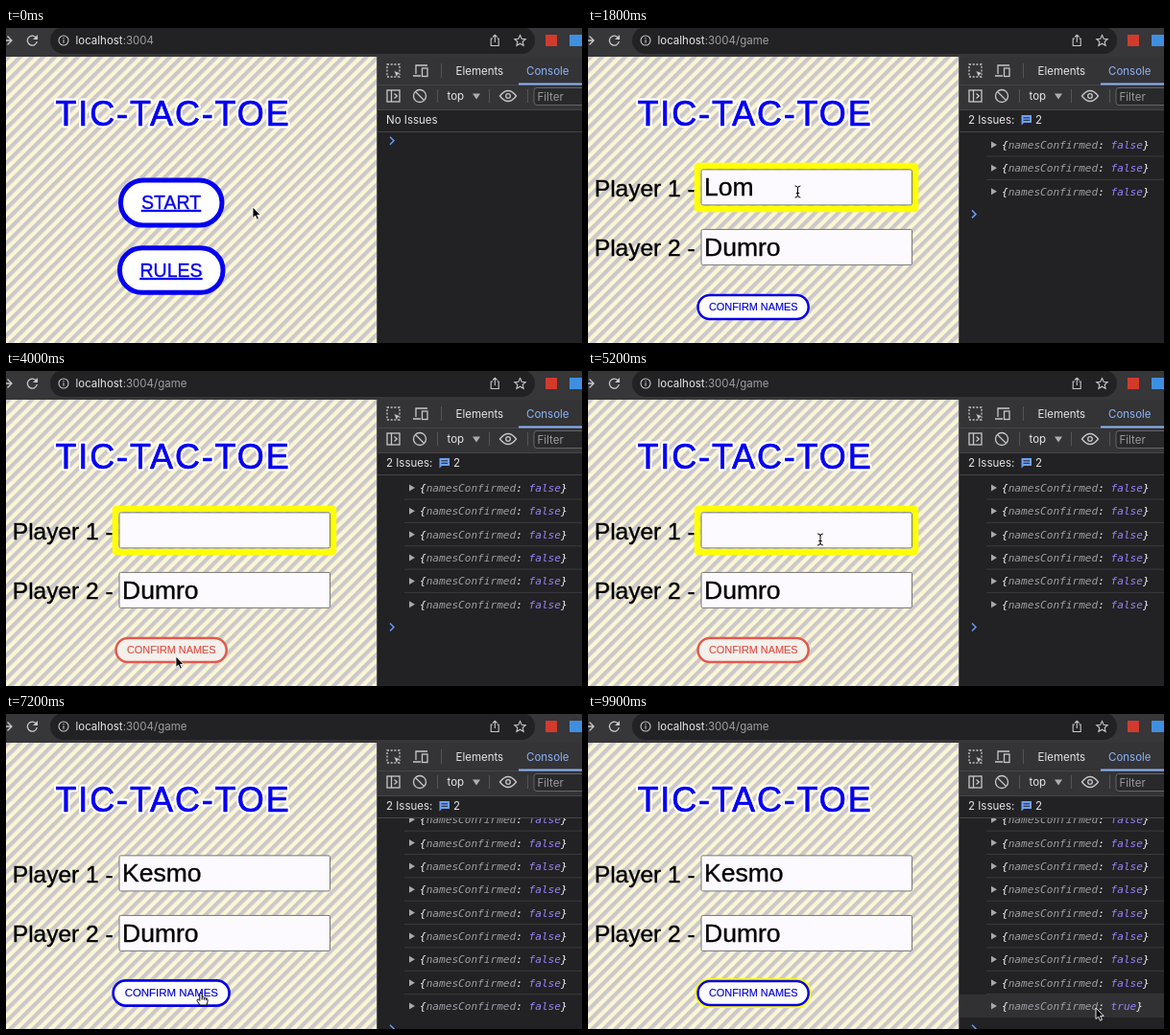
An HTML page that plays this animation: 600 by 329 pixels, repeating every 10 s.

```html
<!DOCTYPE html>
<html lang="en">
<head>
<meta charset="utf-8">
<title>Tic-tac-toe</title>
<style>
html, body { margin: 0; width: 100%; height: 100%; overflow: hidden; background: #222123; }
svg { display: block; width: 100vw; height: 100vh; }
text { white-space: pre; font-family: "Liberation Sans", Arial, sans-serif; }
.ui text { font: 11.5px Inter, Roboto, sans-serif; fill: #e6e6e8; }
.ui text.dim { fill: #9b9a9f; }
.ui text.on { fill: #8ab4f8; }
.ui .log text { font: italic 11.1px "DejaVu Sans Mono", monospace; fill: #f4f4f6; stroke-width: .2px; }
.key { fill: #a09fa5; }
.bool { fill: #9a84fb; }
.icon { fill: none; stroke: #c8c7cb; stroke-width: 1.3; }
.sep { stroke: #555457; }
.title { font-size: 36px; letter-spacing: 1.85px; }
.halo { stroke: #fff; stroke-width: 5px; stroke-linejoin: round; }
.face { fill: #0500f0; stroke: #0500f0; stroke-width: .7px; }
.link text { font-size: 19.5px; fill: #0500f0; stroke: #0500f0; stroke-width: .35px; text-decoration: underline; text-anchor: middle; }
.link rect { fill: #fff; stroke: #0500f0; stroke-width: 5px; }
.label, .value { stroke: #000; stroke-width: .35px; }
.label { font-size: 24.5px; }
.value { font-size: 26.5px; }
.field { fill: #fdfaff; stroke: #767676; }
.ring { fill: none; stroke: #ffff00; }
.confirm text { font-size: 10.9px; text-anchor: middle; fill: #0500d8; stroke: #0500d8; stroke-width: .15px; }
.confirm .pill { fill: #fff; stroke: #0500e6; stroke-width: 2.5px; }
.confirm.off text { fill: #dd5045; stroke: #dd5045; }
.confirm.off .pill { fill: #f4f0ec; stroke: #e05a4e; }
</style>
</head>
<body>
<svg viewBox="0 0 600 329" preserveAspectRatio="none">
  <defs>
    <pattern id="stripes" width="8.5" height="8.5" patternUnits="userSpaceOnUse" patternTransform="translate(0 30) rotate(45)">
      <rect width="8.5" height="8.5" fill="#fcf6d4"/>
      <rect width="4.25" height="8.5" fill="#cbc8cc"/>
    </pattern>
    <text class="title" id="title" x="51.500" y="101.500">TIC-TAC-TOE</text>
    <path id="beamShape" d="M-2.500-6Q0-6 0-4V4Q0 6-2.500 6M2.500-6Q0-6 0-4M0 4Q0 6 2.500 6M-1.300 1.500H1.300"/>
    <clipPath id="consoleArea"><rect x="387" y="109" width="213" height="220"/></clipPath>
  </defs>

  <rect y="30" width="387" height="299" fill="url(#stripes)"/>
  <use class="halo" href="#title"/>
  <use class="face" href="#title"/>

  <g id="home">
    <g class="link" id="start">
      <rect x="119.500" y="159" width="105.500" height="47" rx="23.500"/>
      <text x="172" y="189">START</text>
    </g>
    <g class="link">
      <rect x="118.500" y="229.800" width="107.500" height="46.500" rx="23"/>
      <text x="172" y="260">RULES</text>
    </g>
  </g>

  <g id="game">
    <text class="label" x="6.800" y="175.500">Player 1 -</text>
    <text class="label" x="6.800" y="238">Player 2 -</text>
    <rect class="ring" id="fieldRing" x="114" y="144" width="227" height="45" rx="1" stroke-width="6.5"/>
    <rect class="field" x="118" y="147.900" width="219.500" height="37" rx="1.500"/>
    <rect class="field" x="118" y="210.400" width="219.500" height="37" rx="1.500"/>
    <text class="value" id="first" x="121" y="175"></text>
    <text class="value" x="121" y="237.500">Dumro</text>
    <g class="confirm" id="confirm">
      <rect class="ring" id="confirmRing" x="112.500" y="277.200" width="119" height="28.600" rx="14.300" stroke-width="2.4"/>
      <rect class="pill" x="114.500" y="279" width="115.200" height="25" rx="12.500"/>
      <text x="172.300" y="295.300">CONFIRM NAMES</text>
    </g>
  </g>

  <g class="ui">
    <rect width="600" height="30" fill="#373639"/>
    <rect x="46" y="-1" width="505" height="28" rx="14" fill="#222123"/>
    <path class="icon" d="M-4 13H6M1.500 8.500L6 13L1.500 17.500M31.500 10.300A5 5 0 1 0 32.300 14"/>
    <path d="M33 7v5h-5z" fill="#c8c7cb"/>
    <g class="icon" style="stroke-width:1.1px">
      <circle cx="60" cy="13" r="5"/>
      <path d="M60 12.300v3.500M60 10v1.200"/>
      <path d="M507 11h-1.800v7.500h8V11H511.500M509.300 15V7.500M507 9.500L509.300 7.200L511.600 9.500"/>
      <path d="M535.500 7.500l1.700 3.700 4 .4-3 2.700.9 4-3.600-2.100-3.600 2.100.9-4-3-2.700 4-.4z"/>
    </g>
    <text x="72.500" y="17">localhost<tspan id="path" class="key"></tspan></text>
    <rect x="562" y="7" width="12" height="12" fill="#d23a2c"/>
    <rect x="587" y="7" width="13" height="12" fill="#3f8fe0"/>

    <rect x="387" y="30" width="213" height="299" fill="#222123"/>
    <rect x="387" y="30" width="213" height="55" fill="#343335"/>
    <path d="M387 59.500H600M387 85.500H600M387 108.500H600" stroke="#464548"/>
    <path class="sep" d="M453.500 37v15M449.500 64v14M503.500 64v14M543.500 64v14M386.500 30V329"/>
    <g class="icon">
      <rect x="397" y="38" width="13" height="13" stroke-dasharray="2 1.700"/>
      <path d="M404 44.500l7.500 2.800-3.300 1.300-1.300 3.400z" fill="#c8c7cb" stroke="#343335" stroke-width=".7"/>
      <path d="M427 48V39h12M424 50h8"/>
      <rect x="433.500" y="42" width="5.500" height="8.500"/>
      <rect x="397" y="65" width="13" height="12"/>
      <path d="M401.500 65v12M404.500 68.500l2.800 2.500-2.800 2.500"/>
      <circle cx="431" cy="71" r="6.500"/>
      <path d="M426.500 66.500l9 9"/>
      <path d="M514.500 71q8.500-11 17 0q-8.500 11-17 0z"/>
      <circle cx="523" cy="71" r="2.300"/>
    </g>
    <text x="468.500" y="48.500">Elements</text>
    <text class="on" x="542" y="48.500">Console</text>
    <path d="M534 58.500h66" stroke="#8ab4f8" stroke-width="2"/>
    <text x="459.500" y="75">top</text>
    <path d="M486 68.500h8l-4 6z" fill="#aeadb1"/>
    <rect x="550" y="62.500" width="70" height="18" rx="3" fill="#29282a" stroke="#656467"/>
    <text class="dim" x="553.500" y="75.500">Filter</text>
    <text id="issues" x="396" y="100"></text>
    <g id="badge">
      <path d="M451.500 91h10.500v8h-8l-2.500 2.500z" fill="#6ea0f5"/>
      <path d="M453.500 93.800h6.500M453.500 96.300h6.500" stroke="#222123"/>
      <text x="466" y="100">2</text>
    </g>
    <g class="log" clip-path="url(#consoleArea)">
      <rect id="rowHover" x="387" width="213" height="24" fill="#313033"/>
      <g id="rows"></g>
      <path id="prompt" d="M400 -4l4 4-4 4" fill="none" stroke="#669df6" stroke-width="1.5"/>
    </g>
  </g>

  <g id="pointer">
    <path id="arrow" d="M0 0V11.500L2.700 9.100L4.500 13.200L6.500 12.300L4.700 8.400H8.200Z" fill="#000" stroke="#fff" stroke-width=".9"/>
    <g id="beam" fill="none" stroke-linecap="round">
      <use href="#beamShape" stroke="#fff" stroke-width="2"/>
      <use href="#beamShape" stroke="#000" stroke-width="1"/>
    </g>
    <path id="hand" d="M-1.200 1Q0-.8 1.200 1V4.800Q2.800 4 3.300 5.300Q4.900 4.700 5.300 6Q7 5.700 7 7.300V9.500L5.800 13H-1L-4 8.400Q-4 6.500-2.400 7.200L-1.200 8.400ZM1.200 5V7.500M3.300 5.500V7.700M5.300 6.200V8" fill="#fff" stroke="#000"/>
  </g>
</svg>
<script>
const LOOP = 10000, STEP = 100, ROW = 24.35;
const OPEN = 600, FOCUS = 1200, BLUR = 6700, CLICK = 7800;
const ERASE = [1500, 1700, 1900, 2100, 2300];
const TYPE = [5500, 5700, 5900, 6100, 6300];
const OLD_NAME = 'Lomwa', NEW_NAME = 'Kesmo';

// Pointer hotspot: time, x, y
const TRAIL = [
  [0, 257, 187], [300, 196, 183], [600, 196, 183], [1000, 218.5, 171], [1900, 218.5, 171],
  [2700, 265, 97], [3300, 195, 291], [3800, 170, 300], [4500, 205, 290], [5200, 242, 176],
  [6300, 242, 176], [6900, 203, 291], [8000, 203, 291], [8500, 357, 284],
  [8800, 400, 290], [9400, 529, 307], [LOOP, 529, 307]
];

const $ = id => document.getElementById(id);
const show = (id, on) => { $(id).style.display = on ? '' : 'none'; };
const clamp = v => Math.max(0, Math.min(1, v));
const ease = v => v * v * (3 - 2 * v);
const count = (times, t) => times.filter(x => x <= t).length;
const inside = ([x, y], left, top, right, bottom) => x >= left && x <= right && y >= top && y <= bottom;

function pointerAt(t) {
  const i = Math.max(1, TRAIL.findIndex(p => p[0] > t));
  const [t0, x0, y0] = TRAIL[i - 1], [t1, x1, y1] = TRAIL[i];
  const k = ease(clamp((t - t0) / (t1 - t0)));
  return [x0 + (x1 - x0) * k, y0 + (y1 - y0) * k];
}

function pointerKind(p, inGame, enabled) {
  if (inside(p, 52, 73, 293, 105)) return 'beam';
  if (!inGame) return inside(p, 117, 156, 228, 209) ? 'hand' : 'arrow';
  if (inside(p, 118, 148, 338, 185) || inside(p, 118, 210, 338, 248)) return 'beam';
  return enabled && inside(p, 113, 278, 231, 305) ? 'hand' : 'arrow';
}

// Grows on hover and eases back afterwards
function grow(id, t, enter, leave, cx, cy) {
  const k = ease(clamp((t - enter) / 300)) - ease(clamp((t - leave) / 400));
  const s = 1 + 0.05 * k;
  $(id).setAttribute('transform', `translate(${cx} ${cy}) scale(${s}) translate(${-cx} ${-cy})`);
}

const rows = Array.from({ length: 12 }, (_, i) => {
  const y = 122 + i * ROW;
  const line = i ? `<path d="M415 ${y - 12.35}H600" stroke="#3b3a3d"/>` : '';
  $('rows').insertAdjacentHTML('beforeend', `<g>${line}
    <path d="M420 ${y - 3.5}l6 3.500-6 3.500z" fill="#a9a8ac"/>
    <text x="431" y="${y + 4}">{<tspan class="key">namesConfirmed</tspan>: <tspan class="bool">${i === 11}</tspan>}</text></g>`);
  return $('rows').lastElementChild;
});

function draw(t) {
  const inGame = t >= OPEN, erased = count(ERASE, t), typed = count(TYPE, t);
  const name = typed ? NEW_NAME.slice(0, typed) : OLD_NAME.slice(0, 5 - erased);
  const enabled = name !== '', p = pointerAt(t);

  show('home', !inGame);
  show('game', inGame);
  $('path').textContent = inGame ? ':3004/game' : ':3004';
  $('issues').textContent = inGame ? '2 Issues:' : 'No Issues';
  show('badge', inGame);

  $('first').textContent = name;
  show('fieldRing', t >= FOCUS && t < BLUR);
  show('confirmRing', t >= CLICK);
  $('confirm').classList.toggle('off', !enabled);
  grow('start', t, 200, OPEN, 172, 182.5);
  grow('confirm', t, 6800, 8200, 172, 291.5);

  const logs = inGame ? 1 + erased + typed + (t >= CLICK) : 0;
  const last = 122 + (logs - 1) * ROW;
  const scroll = Math.max(0, last - 305);
  rows.forEach((row, i) => { row.style.display = i < logs ? '' : 'none'; });
  $('rows').setAttribute('transform', `translate(0 ${-scroll})`);
  $('prompt').setAttribute('transform', `translate(0 ${logs ? last - scroll + 23.7 : 117.7})`);
  $('rowHover').setAttribute('y', last - scroll - 12);
  show('rowHover', inside(p, 387, last - scroll - 12, 600, last - scroll + 12));

  const kind = pointerKind(p, inGame, enabled);
  ['arrow', 'beam', 'hand'].forEach(id => show(id, id === kind));
  $('pointer').setAttribute('transform', `translate(${p})`);
}

const origin = performance.now();
function tick() {
  const t = (performance.now() - origin) % LOOP;
  draw(Math.floor(t / STEP) * STEP);
  requestAnimationFrame(tick);
}
tick();
</script>
</body>
</html>
```
